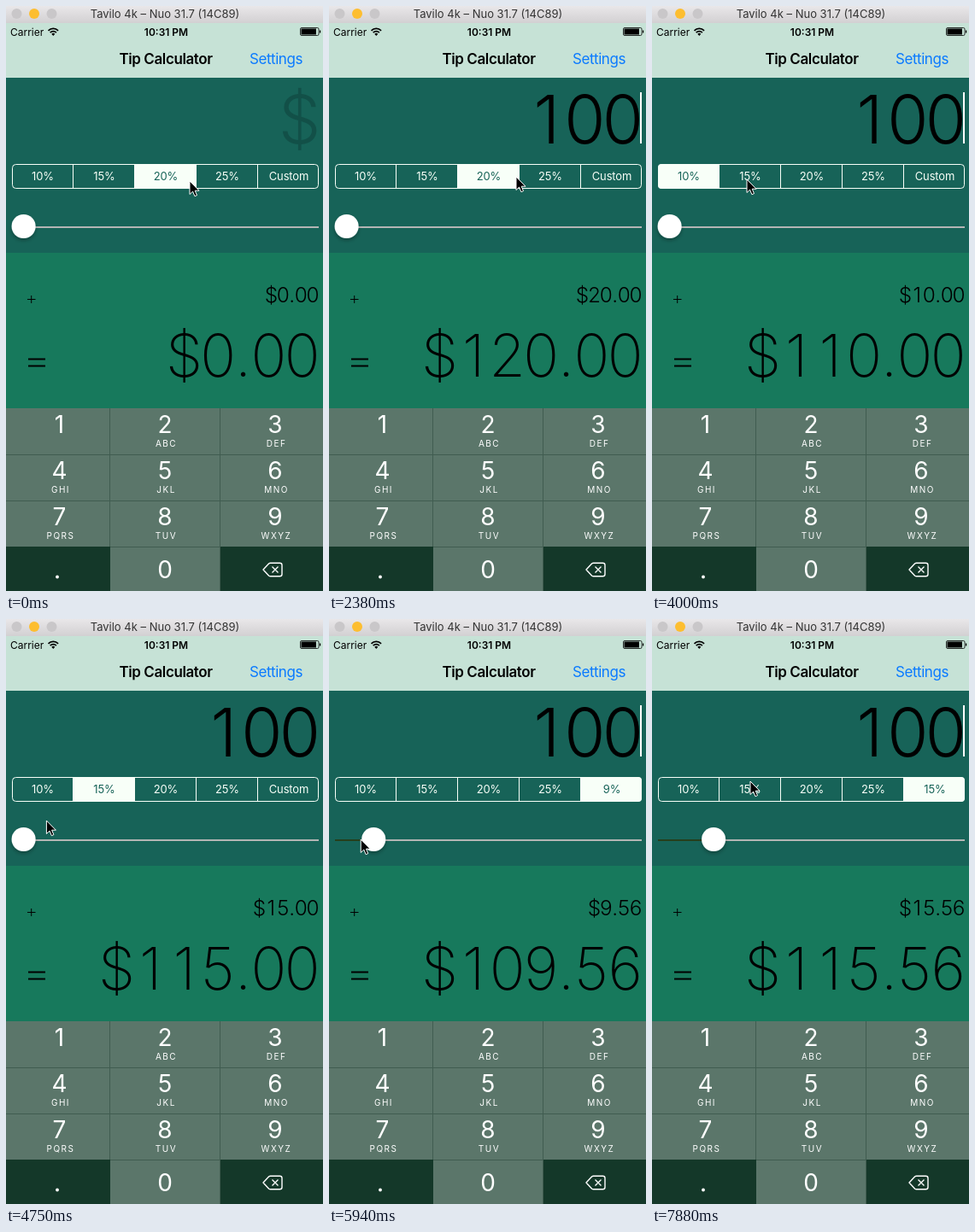
An HTML page that plays this animation: 371 px wide and 685 px high, repeating every 8 s.

```html
<!DOCTYPE html>
<html lang="en">
<head>
<meta charset="utf-8">
<title>Tip Calculator</title>
<style>
  html, body { margin: 0; width: 100%; height: 100%; overflow: hidden; }
  svg { display: block; width: 100%; height: 100%; font-family: Inter, Roboto, sans-serif; }
  .mid, .key text, .figure { text-anchor: middle; }
  .key { fill: #fff; }
  .digit { font-size: 28px; }
  .letters { font-size: 10px; letter-spacing: 1.5px; }
  .segment { font-size: 13px; letter-spacing: -.15px; }
</style>
</head>
<body>
<svg viewBox="0 0 371 685" preserveAspectRatio="none">
  <defs>
    <linearGradient id="bar" x2="0" y2="1">
      <stop stop-color="#e9e7e9"/><stop offset="1" stop-color="#d2d0d2"/>
    </linearGradient>
    <clipPath id="pill"><rect x="7" y="185" width="359" height="29" rx="4"/></clipPath>
    <filter id="shadow" x="-50%" y="-50%" width="200%" height="200%">
      <feDropShadow dx="0" dy="2.5" stdDeviation="2" flood-opacity=".3"/>
    </filter>
  </defs>

  <!-- window title and navigation bar -->
  <rect width="371" height="20" fill="url(#bar)"/>
  <circle cx="12.5" cy="9" r="6" fill="#c9c7c9"/>
  <circle cx="33" cy="9" r="6" fill="#fdbe30"/>
  <circle cx="53.5" cy="9" r="6" fill="#c9c7c9"/>
  <text class="mid" x="186" y="14" font-size="13" fill="#333">Tavilo 4k – Nuo 31.7 (14C89)</text>
  <rect y="20" width="371" height="64" fill="#c6e2d6"/>
  <text x="5" y="35" font-size="12">Carrier</text>
  <path d="M49.5 28.8a8.2 8.2 0 0 1 11.6 0M51.7 31.2a5.1 5.1 0 0 1 7.2 0" fill="none" stroke="#000" stroke-width="1.7"/>
  <path d="M55.3 35l-2-2.2a2.9 2.9 0 0 1 4 0z"/>
  <text class="mid" x="187.5" y="35" font-size="12" font-weight="600">10:31 PM</text>
  <rect x="344.5" y="25.5" width="21.500" height="9" rx="1.5" fill="none" stroke="#000" stroke-width=".8"/>
  <path d="M345.5 26.5h17.5v7h-17.5zM367 28.5h1.200v3h-1.200z"/>
  <text class="mid" x="187" y="68" font-size="17" font-weight="600" letter-spacing="-.4">Tip Calculator</text>
  <text x="285" y="68" font-size="17" letter-spacing="-.45" fill="#0a7aff">Settings</text>

  <!-- calculator -->
  <rect y="84" width="371" height="205" fill="#176358"/>
  <rect y="289" width="371" height="182" fill="#17795c"/>
  <text id="bill" class="figure" font-weight="300"/>
  <rect id="caret" x="364" y="101" width="2" height="60" fill="#fff"/>
  <g id="segments"></g>
  <path d="M7 259H366" stroke="#b4b5b4" stroke-width="2"/>
  <path id="filled" stroke="#263f1c" stroke-width="2"/>
  <circle id="thumb" cy="258" r="14" fill="#fff" filter="url(#shadow)"/>
  <path d="M25 343.5h9.5M29.7 339v9" stroke="#000"/>
  <path d="M26 413.500h20M26 421.500h20" stroke="#000" stroke-width="2"/>
  <text id="tip" class="figure" font-weight="300"/>
  <text id="total" class="figure" font-weight="200"/>

  <!-- keypad -->
  <rect y="471" width="371" height="214" fill="#5b766a"/>
  <path d="M121.5 471V685M250.5 471V685M0 525.5H371M0 579.5H371M0 633.5H371" stroke="#405c50"/>
  <path d="M0 633h122v52H0zM251 633h120v52H251z" fill="#143829"/>
  <g id="keys" class="key"></g>
  <circle cx="60" cy="668.5" r="1.9" fill="#fff"/>
  <path d="M301 660l6.5-7q.8-.8 2-.8h11q2.5 0 2.5 2.5v10.6q0 2.5-2.5 2.5h-11q-1.2 0-2-.8zM311.5 656.5l7 7m0-7l-7 7"
    fill="none" stroke="#fff" stroke-width="1.4" stroke-linejoin="round"/>

  <path id="cursor" d="M0 0V15.5l3.6-3.4 2.3 5.6 2.6-1.1-2.3-5.4H11z" stroke="#fff"/>
</svg>
<script>
const LOOP = 8000;
const TICK = 148.6; // the screen refreshes in steps of this many ms
const PAPER = '#f8fff8', PANEL = '#176358';
const $ = id => document.getElementById(id);

$('keys').innerHTML = ['', 'ABC', 'DEF', 'GHI', 'JKL', 'MNO', 'PQRS', 'TUV', 'WXYZ'].map((letters, i) => {
  const x = [62.5, 186, 315][i % 3], y = 500 + 54 * Math.floor(i / 3);
  return `<text class="digit" x="${x}" y="${y}">${i + 1}</text>
    <text class="letters" x="${x + 1.5}" y="${y + 16}">${letters}</text>`;
}).join('') + '<text class="digit" x="186" y="670">0</text>';

$('segments').innerHTML = [0, 1, 2, 3, 4].map(i => `
  <rect class="cell" x="${6.5 + 72 * i}" y="185" width="72" height="29" clip-path="url(#pill)"/>
  <text class="segment mid" x="${43 + 72 * i}" y="204">${10 + 5 * i}%</text>`).join('') +
  `<path d="M78.5 185v29m72-29v29m72-29v29m72-29v29" stroke="${PAPER}"/>
   <rect x="7.5" y="185.5" width="358" height="28" rx="4" fill="none" stroke="${PAPER}"/>`;
const cells = [...document.querySelectorAll('.cell')];
const labels = [...document.querySelectorAll('.segment')];

// Linear interpolation through [time, ...values] keys.
function track(keys, t) {
  const next = keys.findIndex(key => key[0] > t);
  if (next < 0) return keys.at(-1).slice(1);
  if (next === 0) return keys[0].slice(1);
  const a = keys[next - 1], b = keys[next], k = (t - a[0]) / (b[0] - a[0]);
  return a.slice(1).map((v, i) => v + (b[i + 1] - v) * k);
}

// The last value whose start time has passed.
const step = (steps, t) => steps.filter(s => s[0] <= t).at(-1)[1];

// Right-aligned tabular figures, each centred in its own cell.
function figures(id, text, size, right, baseline) {
  let x = right;
  const xs = [...text].reverse().map(c => {
    const width = (c === '.' ? .278 : .556) * size;
    x -= width;
    return (x + width / 2).toFixed(2);
  }).reverse();
  const el = $(id);
  el.setAttribute('font-size', size * .975);
  el.setAttribute('x', xs.join(' '));
  el.setAttribute('y', baseline);
  el.textContent = text;
}

// Times are in ticks, except for BLINK, which is in ms of a one-second cycle.
const BILL = [[0, 0], [8, 1], [10, 10], [12, 100]];
const SEGMENT = [[0, 2], [23, 0], [28, 1], [35, 4]];
const SLIDER = [[35, 0], [38, 4.68], [41, 12], [44, 14.19], [45, 14.19], [47, 15.56]];
const POINTER = [
  [0, 215, 205], [3, 219, 200], [16, 219, 200], [20, 45, 203], [25, 45, 203],
  [27, 111, 203], [29, 111, 203], [34, 5, 258]
];
const LEAVE = [[49, 57, 258], [53, 115, 190]];
const FIRST_CARET = [[0, 0], [3, 1], [5, 1], [7, 0], [8, 1]];
const BLINK = [[390, 1], [530, 0], [780, 0], [870, 1]];

function draw(tick) {
  const bill = step(BILL, tick), selected = step(SEGMENT, tick);
  const [slider] = track(SLIDER, tick);
  const percent = selected === 4 ? slider : 10 + 5 * selected;
  const tip = bill * percent / 100;

  figures('bill', bill ? String(bill) : '$', 80, 366, 161);
  $('bill').style.fill = bill ? '#000' : '#125048';
  figures('tip', '$' + tip.toFixed(2), 25, 366, 346.5);
  figures('total', '$' + (bill + tip).toFixed(2), 71, 366.5, 434);
  const [caret] = tick < 13 ? track(FIRST_CARET, tick) : track(BLINK, tick * TICK % 1000);
  $('caret').style.opacity = caret;

  cells.forEach((cell, i) => {
    cell.style.fill = i === selected ? PAPER : 'none';
    labels[i].style.fill = i === selected ? PANEL : PAPER;
  });
  labels[4].textContent = selected === 4 ? Math.floor(slider) + '%' : 'Custom';

  const thumb = 20.6 + 3.31 * slider;
  $('thumb').setAttribute('cx', thumb);
  $('filled').setAttribute('d', `M7 259H${thumb}`);

  const [x, y] = tick < 35 ? track(POINTER, tick) : tick < 49 ? [thumb - 15, 258] : track(LEAVE, tick);
  $('cursor').setAttribute('transform', `translate(${x} ${y})`);
}

function frame() {
  draw(Math.floor((performance.now() % LOOP + 14) / TICK));
  requestAnimationFrame(frame);
}
frame();
</script>
</body>
</html>
```
